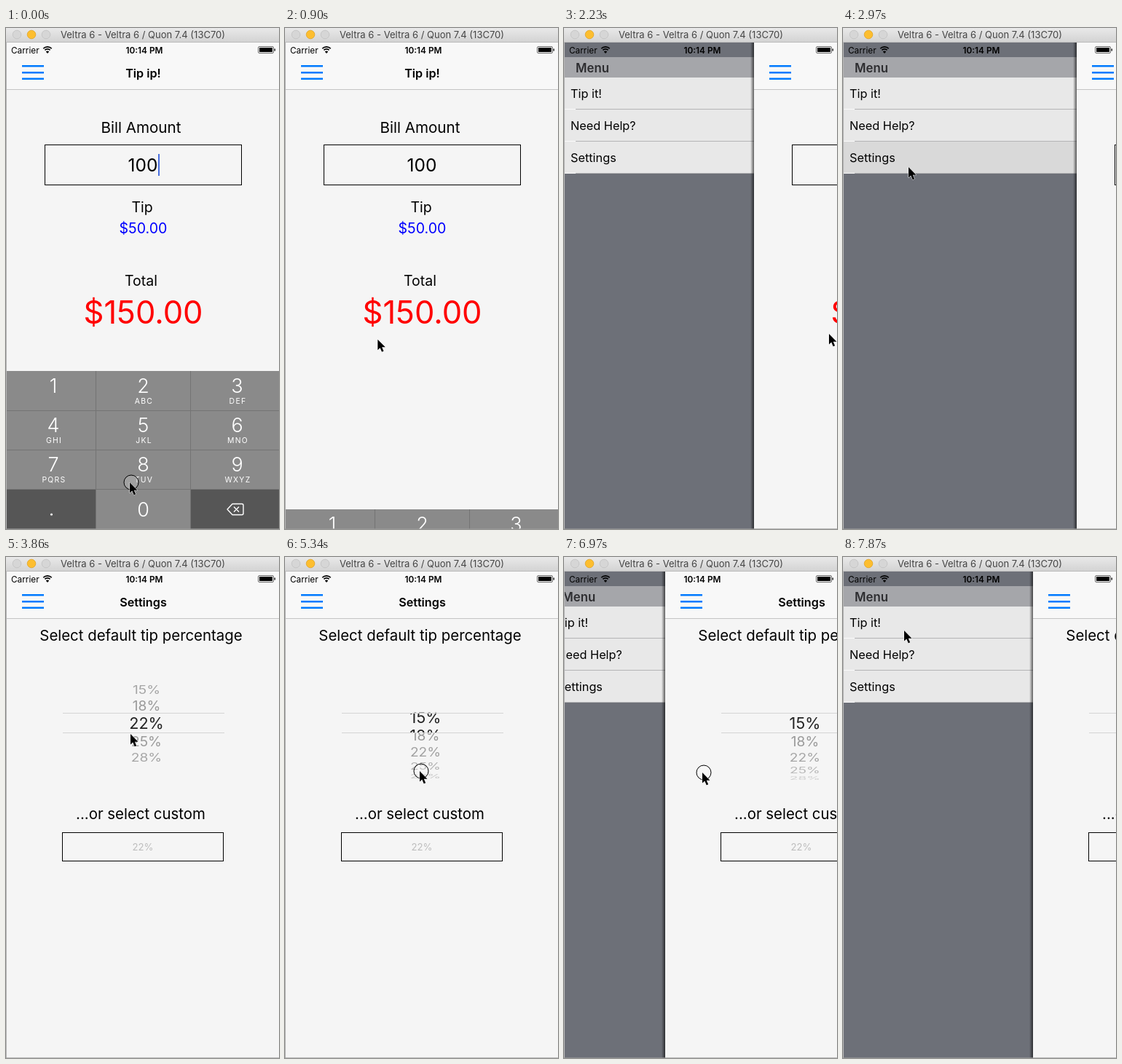
Recreate the animation shown at these times as an HTML page. Size 375 by 688 pixels, loop 8000 ms.

```html
<!DOCTYPE html>
<html lang="en">
<head>
<meta charset="utf-8">
<title>Tip calculator</title>
<style>
html, body { margin: 0; width: 100%; height: 100%; overflow: hidden; background: #f5f5f5; }
svg { display: block; font-family: Inter, Roboto, sans-serif; }
</style>
</head>
<body>
<svg id="stage" width="375" height="688" viewBox="0 0 375 688"></svg>
<script>
const FRAME = 148.4, LOOP = 8000;
const BLUE = '#007aff', PAGE = '#f5f5f5';
const RATES = ['15%', '18%', '22%', '25%', '28%'];

const rect = (x, y, w, h, fill, more = '') =>
  `<rect x="${x}" y="${y}" width="${w}" height="${h}" fill="${fill}" ${more}/>`;
const outline = (x, y, w, h) => rect(x + .5, y + .5, w - 1, h - 1, 'none', 'stroke="#000"');
// Text whose capitals are centred on y
const text = (x, y, s, size, more = '', anchor = 'middle') =>
  `<text x="${x}" y="${y + size * .364}" font-size="${size}" text-anchor="${anchor}" ${more}>${s}</text>`;
const group = (id, body, more = '') => `<g id="${id}" ${more}>${body}</g>`;

const bold = 'font-weight="600"';

function menu() {
  const rows = ['Tip it!', 'Need Help?', 'Settings'].map((s, i) => {
    const y = 68 + i * 44;
    return rect(0, y, 420, 44, '#e8e8e8', `id="row${i}"`) + rect(0, y + 43, 16, 1, '#fafafa') +
      rect(16, y + 43, 400, 1, '#b4b4b6') + text(9, y + 22, s, 16.3, '', 'start');
  }).join('');
  return rect(0, 40, 420, 28, '#a5a6aa') + text(16, 54.5, 'Menu', 16.8, bold + ' fill="#2d2d30"', 'start') + rows;
}

function tipPage() {
  return text(188.5, 62, 'Tip ip!', 16.2, bold) +
    text(185.5, 136.5, 'Bill Amount', 20.6) + outline(53, 160, 271, 56) + text(188, 188.5, '100', 24.5) +
    rect(209, 173, 2, 30, '#4a6fe0', 'id="caret"') +
    text(187, 246, 'Tip', 19.5) + text(188.5, 274.5, '$50.00', 19.6, 'fill="#00f"') +
    text(185.5, 347, 'Total', 19.5) + text(188.5, 390, '$150.00', 43.5, 'fill="#f00"');
}

function settingsPage() {
  const wheel = (cls, size, fill) =>
    RATES.map(s => text(0, 0, s, size, `class="${cls}" fill="${fill}"`)).join('');
  return text(188.5, 62, 'Settings', 16.2, bold) +
    text(185.5, 108, 'Select default tip percentage', 20.4) +
    `<g clip-path="url(#outside)">${wheel('far', 19.2, '#777')}</g>` +
    `<g clip-path="url(#band)">${wheel('near', 21.6, '#222')}</g>` +
    rect(78, 214, 222, 1, '#d4d4d4') + rect(78, 241, 222, 1, '#d4d4d4') +
    text(185, 353, '...or select custom', 20.4) + outline(77, 378, 222, 40) +
    text(188, 398, '22%', 13.2, 'fill="#bdbdbd"');
}

function keypad() {
  const xs = [65, 188.5, 317.5];
  const letters = ['', 'ABC', 'DEF', 'GHI', 'JKL', 'MNO', 'PQRS', 'TUV', 'WXYZ'];
  const white = 'fill="#fff" font-weight="300"';
  let out = rect(1, 471, 374, 217, '#8a8a8a') + rect(1, 633, 123, 55, '#565656') + rect(253, 633, 122, 55, '#565656');
  for (const y of [525, 579, 633]) out += rect(1, y, 374, 1, '#747474');
  for (const x of [123, 253]) out += rect(x, 471, 1, 217, '#747474');
  letters.forEach((s, i) => {
    const x = xs[i % 3], y = 491 + 54 * Math.floor(i / 3);
    out += text(x, y, i + 1, 27, white) + text(x + 1, y + 21, s, 10.4, 'fill="#fff" letter-spacing="1.3"');
  });
  return out + text(188.5, 661, '0', 27, white) + '<circle cx="62.5" cy="668" r="1.6" fill="#fff"/>' +
    '<path d="M304 661l7-7.5h13q2 0 2 2v11q0 2-2 2h-13zM313 657.500l7 7m0-7l-7 7" fill="none" stroke="#fff" stroke-width="1.4" stroke-linejoin="round"/>';
}

function statusBar() {
  const arc = r => `M${57 - r * .72} ${34 - r * .72}A${r} ${r} 0 0 1 ${57 + r * .72} ${34 - r * .72}`;
  return text(7, 30.500, 'Carrier', 11.8, '', 'start') + text(190, 30.500, '10:14 PM', 11.8, bold) +
    `<path d="${arc(8)}${arc(5)}" fill="none" stroke="#000" stroke-width="1.7"/><path d="M57 35l-2.200-2.600q2.200-1.800 4.400 0z"/>` +
    rect(346.500, 25.500, 21, 9, 'none', 'rx="1.5" stroke="#444" stroke-width=".8"') +
    rect(348, 27, 18, 6, '#000') + rect(368.500, 28.500, 1.500, 3, '#222');
}

function titleBar() {
  const light = (x, fill, edge) => `<circle cx="${x}" cy="9" r="5.800" fill="${fill}" stroke="${edge}" stroke-width=".8"/>`;
  return rect(0, 0, 375, 20, 'url(#chrome)') + rect(0, 19, 375, 1, '#bcbcbc') +
    light(15, '#d6d6d6', '#c2c2c2') + light(35, '#fdbe2f', '#e0a426') + light(55, '#d6d6d6', '#c2c2c2') +
    text(188, 9.500, 'Veltra 6 - Veltra 6 / Quon 7.4 (13C70)', 13, 'fill="#444"');
}

const stage = document.getElementById('stage');
stage.innerHTML = `<defs>
  <linearGradient id="chrome" x2="0" y2="1"><stop stop-color="#e9e9e9"/><stop offset="1" stop-color="#d2d2d2"/></linearGradient>
  <linearGradient id="shade"><stop stop-color="#000" stop-opacity="0"/><stop offset="1" stop-color="#000" stop-opacity=".6"/></linearGradient>
  <clipPath id="band"><rect x="78" y="215" width="222" height="26"/></clipPath>
  <clipPath id="outside"><path d="M78 140H300V214H78zM78 242H300V320H78z"/></clipPath></defs>` +
  rect(0, 0, 375, 688, '#6d7078') +
  group('menu', menu()) +
  group('front', rect(-4, 20, 5, 668, 'url(#shade)') + rect(1, 20, 375, 668, PAGE) +
    rect(1, 20, 375, 64, '#f8f8f8') + rect(1, 84, 375, 1, '#c4c4c4') +
    [51, 60, 68.500].map(y => rect(22, y, 30, 2.500, BLUE)).join('') +
    group('tip', tipPage()) + group('settings', settingsPage())) +
  group('keys', keypad()) + statusBar() + rect(0, 20, 1, 668, '#b5b5b5') + rect(0, 687, 375, 1, '#999', 'opacity=".6"') +
  titleBar() +
  group('cursor', '<circle id="touch" cx="2" r="10" fill="#fff" fill-opacity=".2" stroke="#000"/>' +
    '<path d="M0 0v14.500l3.300-3 2.400 5.700 2.500-1-2.400-5.500h4.700z" stroke="#fff" stroke-width="1" paint-order="stroke"/>');

const el = id => document.getElementById(id);
const far = [...stage.querySelectorAll('.far')], near = [...stage.querySelectorAll('.near')];

// Keys are [frame, value, ...]; values run linearly between them
function at(keys, k, n = 1) {
  const i = keys.findIndex(q => q[0] >= k);
  if (i < 0) return keys[keys.length - 1][n];
  if (!i) return keys[0][n];
  const a = keys[i - 1], b = keys[i];
  return a[n] + (b[n] - a[n]) * (k - a[0]) / (b[0] - a[0]);
}

const pointer = [[0, 170, 624], [4, 130, 435], [7, 126, 424], [8, 136, 424], [11, 236, 424], [14, 362, 422], [15, 364, 420],
  [18, 92, 193], [19, 90, 191], [23, 90, 191], [26, 171, 243], [27, 178, 246], [30, 183, 282], [32, 184, 264],
  [33, 184, 266], [36, 185, 294], [37, 186, 300], [38, 110, 288], [39, 53, 281], [40, 21, 281], [42, 21, 281],
  [44, 56, 295], [47, 190, 296], [49, 345, 375], [50, 364, 398], [53, 84, 101]];
const slide = [[7, 0], [8, 10], [11, 110], [13, 210], [14, 252], [15, 260], [18, 260], [19, 305], [20, 320],
  [21, 245], [22, 70], [23, 0], [43, 0], [44, 4], [45, 42], [47, 138], [48, 216], [49, 254], [50, 260]];
const dial = [[27, 2], [30, 1.05], [31, 1], [33, 1], [36, .33], [37, .08], [38, 0]];
const touches = [[0, 0], [5, 5], [8, 13], [18, 18], [27, 30], [33, 37], [43, 49]];

function draw(k) {
  const x = at(slide, k), pick = at(dial, k);
  const move = (id, dx, dy) => el(id).setAttribute('transform', `translate(${dx} ${dy})`);
  const show = (id, on) => el(id).setAttribute('display', on ? 'inline' : 'none');
  move('menu', 40 * Math.min(0, x / 260 - 1), 0);
  move('front', x, 0);
  move('keys', 0, at([[4, 0], [5, 60], [6, 190], [7, 217]], k));
  move('cursor', at(pointer, k, 1), at(pointer, k, 2));
  show('touch', touches.some(([a, b]) => k >= a && k <= b));
  show('caret', k < 5);
  show('tip', k < 21);
  show('settings', k >= 21);
  el('row2').setAttribute('fill', k >= 19 && k < 24 ? '#d9d9d9' : '#e8e8e8');
  // Rows sit on a cylinder, 18 degrees apart
  RATES.forEach((_, i) => {
    const a = (i - pick) * Math.PI / 10, y = 228.5 + 79 * Math.sin(a), c = Math.cos(a);
    far[i].setAttribute('transform', `translate(193 ${y}) scale(1 ${c})`);
    far[i].setAttribute('opacity', .1 + .65 * c);
    near[i].setAttribute('transform', `translate(193 ${y})`);
  });
}

function tick() {
  draw(Math.min(53, Math.floor((performance.now() % LOOP + 12) / FRAME)));
  requestAnimationFrame(tick);
}
tick();
</script>
</body>
</html>
```
